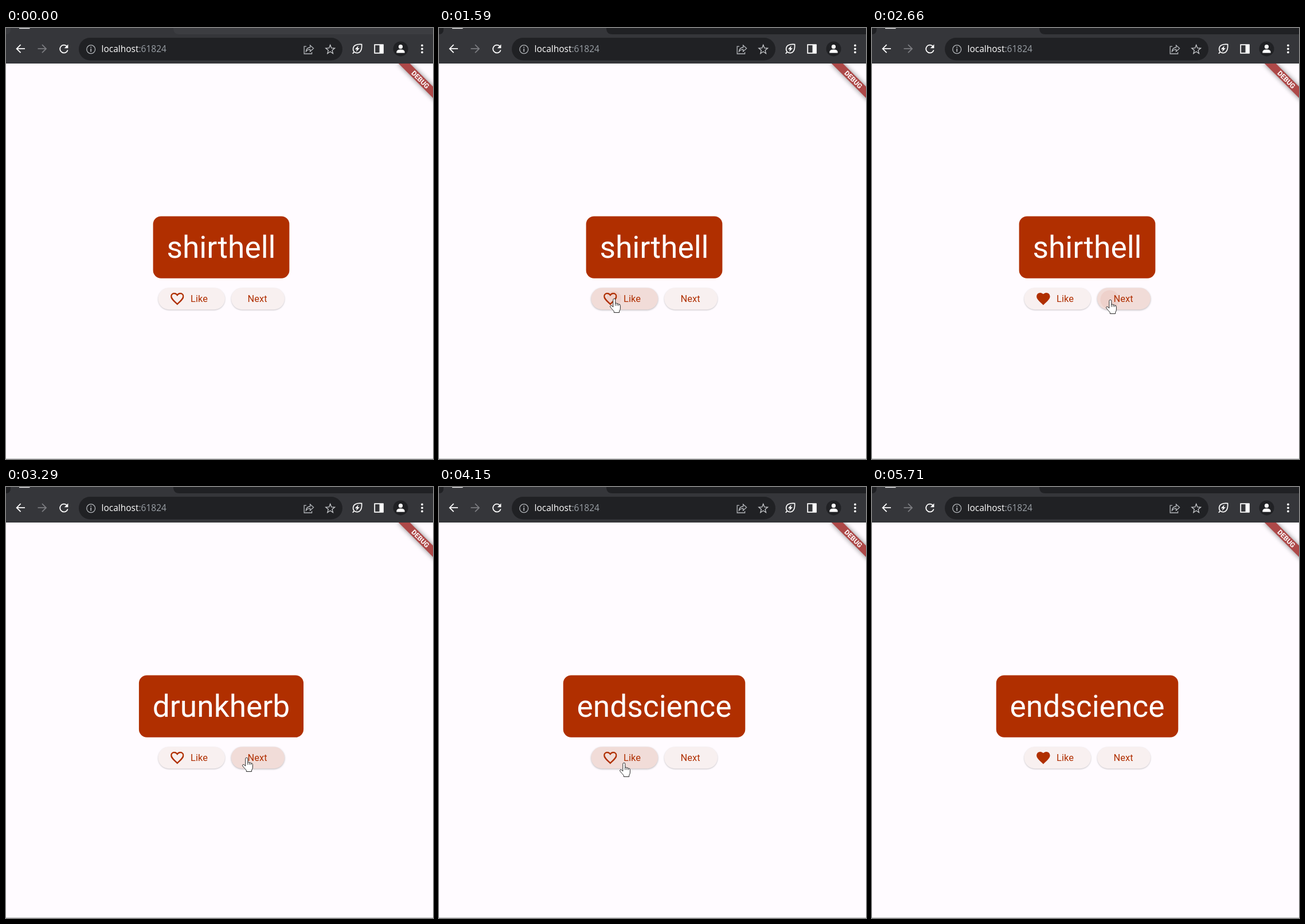
Recreate the animation shown at these times as an HTML page. Size 745x752 px, loop 6580 ms.

```html
<!DOCTYPE html>
<html lang="en">
<head>
<meta charset="utf-8">
<title>Word pairs</title>
<style>
  html, body { margin: 0; width: 100%; height: 100%; overflow: hidden; background: #fffbff; }
  svg { display: block; width: 745px; height: 752px; }
  .app { font-family: Roboto, sans-serif; }
  .url { font: 15.5px "Open Sans", "Noto Sans", sans-serif; fill: #fff; }
  .url tspan { fill: #9aa0a6; }
  .word { font-size: 53.3px; fill: #fff; text-anchor: middle; }
  .label { font-size: 16.4px; letter-spacing: .12px; fill: #b02f00; }
  .debug { font-size: 11.9px; font-weight: 700; fill: #fff; text-anchor: middle; }
  .line { fill: none; stroke: #fff; stroke-width: 1.8; }
  .thin { fill: none; stroke: #b4b7bb; stroke-width: 1.3; }
  .pointer { fill: #fff; stroke: #2a2a2a; stroke-width: 1; stroke-linejoin: round; }
</style>
</head>
<body>
<svg viewBox="0 0 745 752">
  <defs>
    <path id="heart" d="M12 21.35l-1.45-1.32C5.4 15.36 2 12.28 2 8.5 2 5.42 4.42 3 7.5 3c1.74 0 3.41.81 4.5 2.09C13.09 3.81 14.76 3 16.5 3 19.58 3 22 5.42 22 8.5c0 3.78-3.4 6.86-8.55 11.54z"/>
    <clipPath id="heartClip"><use href="#heart"/></clipPath>
    <clipPath id="likeClip"><use href="#like"/></clipPath>
    <clipPath id="nextClip"><use href="#next"/></clipPath>
    <clipPath id="pageClip"><rect y="62" width="745" height="690"/></clipPath>
  </defs>

  <rect width="745" height="752" fill="#fffbff"/>

  <g class="app">
    <g clip-path="url(#pageClip)">
      <g transform="translate(722.9 90.1) rotate(45)">
        <rect x="-47" y="-7" width="94" height="14" fill="#ad4848" style="filter:drop-shadow(0 0 4px rgba(0,0,0,.5))"/>
        <text class="debug" y="4.1">DEBUG</text>
      </g>
    </g>

    <rect id="card" y="328.4" height="108.4" rx="14" fill="#b02f00"/>
    <text id="word" class="word" x="375.5" y="400.7"></text>

    <rect id="like" x="265.5" y="453.4" width="116.5" height="37.8" rx="18.9"/>
    <rect id="next" x="393" y="453.4" width="93" height="37.8" rx="18.9"/>
    <g clip-path="url(#likeClip)"><circle id="likeInk" fill="#b02f00"/></g>
    <g clip-path="url(#nextClip)"><circle id="nextInk" fill="#b02f00"/></g>
    <g transform="translate(284.8 458.4) scale(1.17)">
      <use id="full" href="#heart" fill="#b02f00"/>
      <use id="empty" href="#heart" fill="none" stroke="#b02f00" stroke-width="4" clip-path="url(#heartClip)"/>
    </g>
    <text class="label" x="322" y="478">Like</text>
    <text class="label" x="421.4" y="478">Next</text>
  </g>

  <rect id="strip" width="745" height="12"/>
  <path d="M0 62V11Q8 11 8 2V0H292V2Q293 11 302 11H745V62Z" fill="#35363a"/>
  <rect x="23" width="18.5" height="1.2" fill="#fff"/>
  <rect x="127" y="17" width="460" height="39.5" rx="19.7" fill="#202124"/>
  <path class="line" d="M33 36.2H19M25.6 29.2L18.6 36.2L25.6 43.2"/>
  <path class="line" style="stroke:#7b7c80" d="M55.5 36.2H69.5M63 29.2L70 36.2L63 43.2"/>
  <path class="line" d="M106.3 32A6.9 6.9 0 1 0 107.7 38.4"/>
  <path fill="#fff" d="M108.4 28.6V35.2H101.8Z"/>
  <circle class="thin" cx="148.2" cy="37.2" r="7.4"/>
  <path class="thin" style="stroke-width:1.7" d="M148.2 36V41.4M148.2 32.8V34.5"/>
  <text class="url" x="166.5" y="42.4">localhost<tspan>:61824</tspan></text>
  <path class="thin" d="M524 32.2H520.2V45H533.6V42M523.4 41Q524.2 34.2 530.6 34V30.2L536.6 35.6L530.6 41V37.3Q526.2 37.3 523.4 41Z"/>
  <path id="star" class="thin" style="stroke:#c8cacd"/>
  <path class="line" style="stroke-width:1.7" d="M620.6 28.6Q606 27.4 605.6 36.8Q606 43.4 612.6 43.6Q621.4 43 620.6 28.6ZM607.8 41.6L604.8 44.6"/>
  <path fill="#fff" d="M614.8 30.8L608.8 37.2H612.2L610.8 41.6L617 35.2H613.6Z"/>
  <rect class="line" x="643.2" y="29.2" width="14.6" height="14.6"/>
  <rect x="651.6" y="29" width="7" height="15" fill="#fff"/>
  <circle cx="688.5" cy="36.4" r="13" fill="#202124"/>
  <circle cx="688.5" cy="32.7" r="3.6" fill="#fff"/>
  <path fill="#fff" d="M681.4 43.4V41.4Q682 37.6 688.5 37.6Q695 37.6 695.6 41.4V43.4Z"/>
  <path d="M726 30.4v0M726 36.4v0M726 42.4v0" stroke="#fff" stroke-width="3.8" stroke-linecap="round"/>
  <rect y="751" width="745" height="1" fill="#c3c1c5"/>

  <g id="hand" class="pointer">
    <path d="M-1.2 13V2.3a2 2 0 0 1 4 0V8.2Q5 7.6 5.9 9Q7.8 8.4 8.6 9.9Q11.3 9.6 11.4 12.2V17Q11.4 20 9.6 22V24.5H.3V22.2Q-3 18.6-6.2 14.8Q-6.9 12.6-5.2 12.1Q-3.3 12-1.2 15Z"/>
    <path fill="none" d="M2.8 8V12.6M5.9 9V12.6M8.6 10V12.6"/>
  </g>
  <path id="arrow" class="pointer" d="M0 0V18.4L4.2 14.6L7 21L10 19.7L7.2 13.4H13Z"/>
</svg>

<script>
const LOOP = 6580, STEP = 67.5, PHASE = 25;
const ENTER = 120, LEAVE = 5690, FADE = 200, RELEASE = 140;
const WORDS = ['shirthell', 'drunkherb', 'endscience'];

const clicks = [
  { at: 1530, on: 'like' }, { at: 2590, on: 'next' },
  { at: 3620, on: 'next' }, { at: 4500, on: 'like' },
];

// pointer glides: from time, to time, x, y
const entry = [612, 687];
const glides = [
  [120, 450, 315, 463], [980, 1180, 305, 472], [1780, 2150, 372, 500],
  [2150, 2450, 415, 474], [2860, 3280, 419, 472], [3740, 4300, 299, 483],
  [4820, 5090, 345, 566], [5090, 5300, 450, 608], [5300, 5680, 697, 256],
];

const $ = id => document.getElementById(id);
const clamp = v => Math.max(0, Math.min(1, v));
const mix = (a, b, k) => a + (b - a) * k;
const ease = k => k * k * (3 - 2 * k);
const set = (el, attrs) => { for (const k in attrs) el.setAttribute(k, attrs[k]); };
const show = (el, on) => { el.style.display = on ? '' : 'none'; };

const boxes = { like: $('like').getBBox(), next: $('next').getBBox() };

function pointerAt(t) {
  let [x, y] = entry;
  for (const [a, b, toX, toY] of glides) {
    const k = ease(clamp((t - a) / (b - a)));
    x = mix(x, toX, k);
    y = mix(y, toY, k);
  }
  return [x, y];
}

function isOver(id, t) {
  const [x, y] = pointerAt(t), b = boxes[id];
  return x > b.x && x < b.x + b.width && y > b.y && y < b.y + b.height;
}

// share of the last FADE ms spent over the button
function hoverLevel(id, t) {
  const n = 20;
  let hits = 0;
  for (let i = 0; i < n; i++) hits += isOver(id, t - FADE * i / n);
  return hits / n;
}

function drawButton(id, t) {
  const h = hoverLevel(id, t);
  const el = $(id);
  el.setAttribute('fill', `rgb(${mix(248, 241, h)}, ${mix(240, 220, h)}, ${mix(240, 216, h)})`);
  el.style.filter = `drop-shadow(0 ${mix(1, 1.4, h)}px ${mix(.8, 1.6, h)}px rgba(0,0,0,${mix(.22, .28, h)}))`;

  const press = clicks.filter(c => c.on === id && t >= c.at).pop();
  const ink = $(id + 'Ink');
  show(ink, press);
  if (!press) return;
  const age = t - press.at;
  const [cx, cy] = pointerAt(press.at);
  set(ink, { cx, cy, r: 5 + age * .17, opacity: .06 * clamp((450 - age) / 250) });
}

function drawCard(t) {
  let index = 0, liked = false;
  for (const c of clicks) {
    if (t < c.at + RELEASE) break;
    if (c.on === 'next') index++;
    liked = c.on === 'like' && !liked;
  }
  const word = $('word');
  if (word.textContent !== WORDS[index]) word.textContent = WORDS[index];
  const width = word.getComputedTextLength() + 47.6;
  set($('card'), { x: 375.5 - width / 2, width });
  show($('full'), liked);
  show($('empty'), !liked);
}

function drawPointer(t) {
  const visible = t >= ENTER && t < LEAVE;
  const over = isOver('like', t) || isOver('next', t);
  const [x, y] = pointerAt(t).map(Math.round);
  show($('hand'), visible && over);
  show($('arrow'), visible && !over);
  set($(over ? 'hand' : 'arrow'), { transform: `translate(${x} ${y})` });
}

function draw(time) {
  const t = PHASE + Math.floor((time % LOOP - PHASE) / STEP) * STEP;
  drawCard(t);
  drawButton('like', t);
  drawButton('next', t);
  drawPointer(t);
  $('strip').setAttribute('fill', t < clicks[0].at ? '#3c3d41' : '#202124');
}

const star = Array.from({ length: 10 }, (_, i) => {
  const a = Math.PI * (i / 5 - .5), r = i % 2 ? 3.5 : 8.2;
  return `${565.7 + r * Math.cos(a)} ${37.8 + r * Math.sin(a)}`;
});
$('star').setAttribute('d', `M${star.join('L')}Z`);

const start = performance.now();
function frame() {
  draw(performance.now() - start);
  requestAnimationFrame(frame);
}
frame();
</script>
</body>
</html>
```
